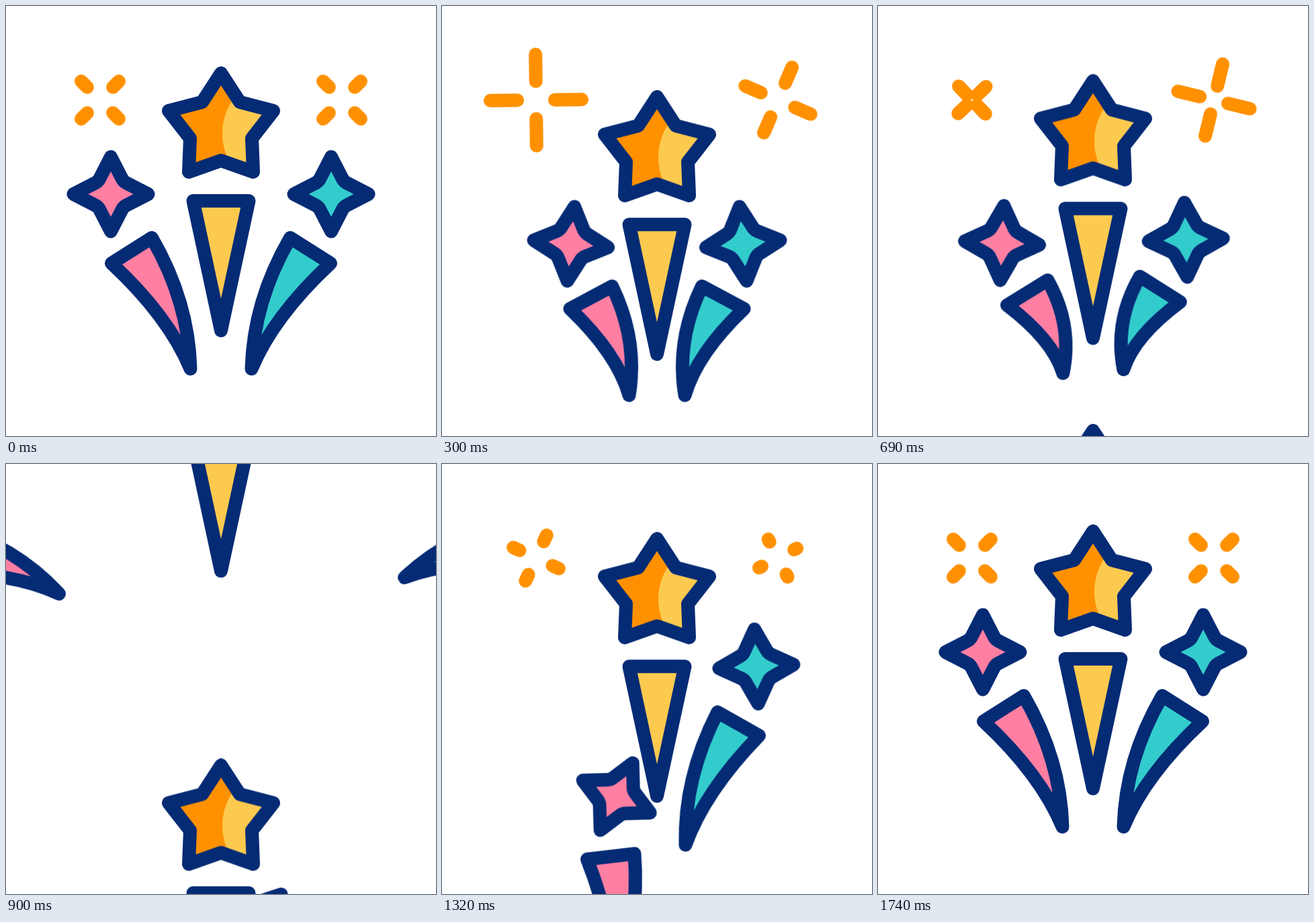
Animation of 640 by 640 pixels, one loop 1.77 s. Source, as an HTML page:

```html
<!DOCTYPE html>
<html lang="en">
<head>
<meta charset="utf-8">
<title>Fireworks</title>
<style>
  html, body { margin: 0; width: 100%; height: 100%; overflow: hidden; background: #fff; }
  svg { display: block; width: 100%; height: 100%; }

  .ink { stroke: #052b75; stroke-width: 20; stroke-linejoin: round; }
  .burst { fill: none; stroke: #ff9100; stroke-width: 20; stroke-linecap: round; }
  .left { fill: #ff7fa3; }
  .right { fill: #33cccc; }

  .leave, .arrive, .rise-out, .rise-in, .side-out, .side-in, .squash-tail, .squash-spark,
  .spin-out, .spin-in, .trim-out, .trim-in {
    animation: 1770ms cubic-bezier(.33333, 0, .66667, 1) infinite;
    animation-delay: calc(var(--lag, 0ms) - 1770ms);
  }

  /* Departing and arriving sets overlap for a while */
  .leave { animation-name: leave; }
  .arrive { animation-name: arrive; }
  @keyframes leave { 0%, 62% { opacity: 1 } 62.01%, 100% { opacity: 0 } }
  @keyframes arrive { 0%, 33.9% { opacity: 0 } 33.91%, 100% { opacity: 1 } }

  /* Centre rocket */
  .rise-out { animation-name: rise-out; }
  .rise-in { animation-name: rise-in; }
  @keyframes rise-out {
    0% { transform: translateY(0) }
    33.05% { transform: translateY(67.4px) }
    74.01%, 100% { transform: translateY(-900px) }
  }
  @keyframes rise-in {
    0%, 28.53% { transform: translateY(600px) }
    78.7%, 100% { transform: translateY(0) }
  }

  /* Side rockets swing around a far pivot */
  .side-out, .side-in { transform-origin: -264px 615px; }
  .side-out { animation-name: side-out; }
  .side-in { animation-name: side-in; }
  @keyframes side-out {
    0% { transform: rotate(0deg) }
    33.05% { transform: rotate(8deg) }
    74.01%, 100% { transform: rotate(var(--end)) }
  }
  @keyframes side-in {
    0%, 41.92% { transform: rotate(53deg) }
    80%, 100% { transform: rotate(0deg) }
  }

  .tail { d: path("M157 383L217 345Q272 440 274.5 540Q242 462 157 383Z"); }
  .squash-tail { animation-name: squash-tail; }
  .squash-spark { animation-name: squash-spark; }
  @keyframes squash-tail {
    0%, 57.18%, 100% { d: path("M157 383L217 345Q272 440 274.5 540Q242 462 157 383Z") }
    33.05% { d: path("M196 450L256 412Q291.5 473.5 274.5 540Q261.5 495.5 196 450Z") }
  }
  @keyframes squash-spark {
    0%, 57.18%, 100% { transform: translate(0px, 0px) rotate(0deg) }
    33.05% { transform: translate(30px, 79.5px) rotate(2.5deg) }
  }

  /* Bursts: stretch and spin, collapse, then grow back */
  .spin-out { animation-name: spin-out; }
  .spin-in { animation-name: spin-in; }
  .trim-out { animation-name: trim-out; }
  .trim-in { animation-name: trim-in; }
  @keyframes spin-out {
    0%, 92%, 100% { transform: rotate(45deg) }
    21.75%, 22.6% { transform: rotate(-7deg) }
    51.53% { transform: rotate(81deg) }
    0%, 41.5% { opacity: 1 }
    41.51%, 91.99% { opacity: 0 }
    92%, 100% { opacity: 1 }
  }
  @keyframes trim-out {
    0%, 92%, 100% { d: path("M0 -27L0 -39.6M27 0L39.6 0M0 27L0 39.6M-27 0L-39.6 0") }
    21.75%, 22.6% { d: path("M0 -28L0 -72M28 0L72 0M0 28L0 72M-28 0L-72 0") }
    51.53% { d: path("M0 0L0 0M0 0L0 0M0 0L0 0M0 0L0 0") }
  }
  @keyframes spin-in {
    0%, 55.93% { transform: rotate(-60deg) }
    81.92%, 100% { transform: rotate(45deg) }
    0%, 55.92% { opacity: 0 }
    55.93%, 100% { opacity: 1 }
  }
  @keyframes trim-in {
    0%, 55.93% { d: path("M0 -27L0 -28M27 0L28 0M0 27L0 28M-27 0L-28 0") }
    81.92%, 100% { d: path("M0 -27L0 -39.6M27 0L39.6 0M0 27L0 39.6M-27 0L-39.6 0") }
  }
</style>
</head>
<body>
<svg viewBox="0 0 640 640">
  <defs>
    <path id="starShape" d="M320 100L348 143L398 156L366 197L368 247L320 230L272 247L274 197L242 156L292 143Z"/>
    <clipPath id="starClip"><use href="#starShape"/></clipPath>
    <path id="spark" d="M0 -55.5L17 -22.5Q19 -19 22.5 -17L55.5 0L22.5 17Q19 19 17 22.5L0 55.5L-17 22.5Q-19 19 -22.5 17L-55.5 0L-22.5 -17Q-19 -19 -17 -22.5Z"/>
    <g id="rocket">
      <use href="#starShape" fill="#ff9100"/>
      <circle cx="412" cy="190" r="90" fill="#fdca50" clip-path="url(#starClip)"/>
      <use href="#starShape" class="ink" fill="none"/>
      <path class="ink" fill="#fdca50" d="M278.5 290H361.5L320 483Z"/>
    </g>
  </defs>

  <g class="leave">
    <g class="left ink">
      <g class="side-out" style="--end:-118deg">
        <path class="tail squash-tail"/>
        <g transform="translate(156 280)"><g class="squash-spark"><use href="#spark"/></g></g>
      </g>
    </g>
    <g class="right ink" transform="matrix(-1 0 0 1 640 0)">
      <g class="side-out" style="--end:-128.5deg">
        <path class="tail squash-tail"/>
        <g transform="translate(156 280)"><g class="squash-spark"><use href="#spark"/></g></g>
      </g>
    </g>
    <g class="rise-out"><use href="#rocket"/></g>
    <g class="burst" transform="translate(140 140)">
      <g class="spin-out"><path class="trim-out"/></g>
    </g>
    <g class="burst" transform="translate(500 140)" style="--lag:130ms">
      <g class="spin-out"><path class="trim-out"/></g>
    </g>
  </g>

  <g class="arrive">
    <g class="left ink" style="--lag:235ms">
      <g class="side-in">
        <path class="tail"/>
        <use href="#spark" x="156" y="280"/>
      </g>
    </g>
    <g class="right ink" transform="matrix(-1 0 0 1 640 0)">
      <g class="side-in">
        <path class="tail"/>
        <use href="#spark" x="156" y="280"/>
      </g>
    </g>
    <g class="rise-in"><use href="#rocket"/></g>
    <g class="burst" transform="translate(140 140)">
      <g class="spin-in"><path class="trim-in"/></g>
    </g>
    <g class="burst" transform="translate(500 140)" style="--lag:160ms">
      <g class="spin-in"><path class="trim-in"/></g>
    </g>
  </g>
</svg>
</body>
</html>
```
